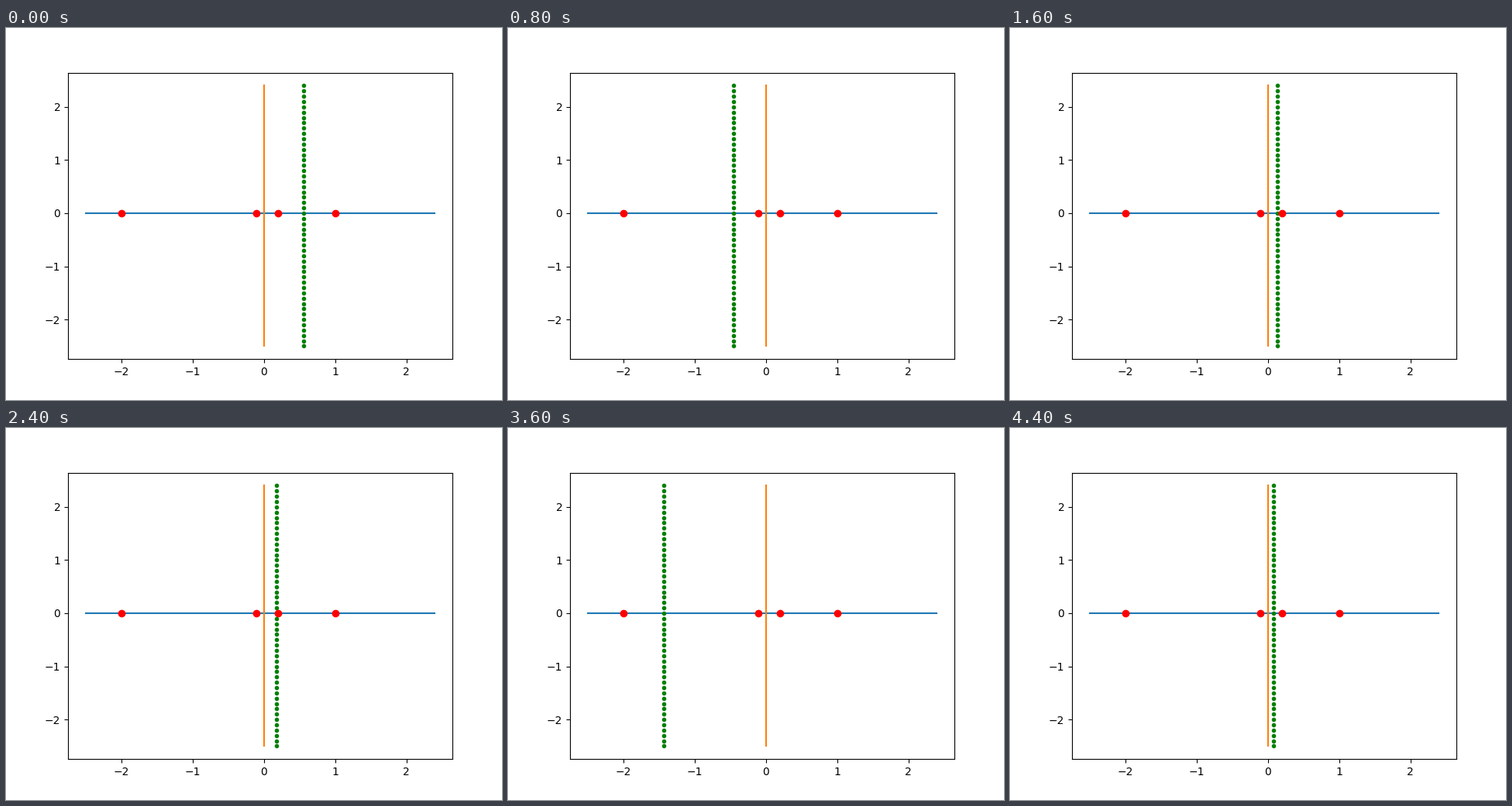
These frames come from a looping animation (640 px wide and 480 px high, 4.8 s). A matplotlib script:

```python
import numpy as np
import matplotlib.pyplot as plt
from matplotlib.animation import FuncAnimation

# Key points of the dotted line, one per step, with a hard jump between them
STOPS = (0.56, 0.35, -0.45, -1.43, 0.13, -0.9,
         0.18, -0.1, 0.07, -1.43, 0.6, 0.08)
LOOP_MS = 4800

fig, ax = plt.subplots(figsize=(6.4, 4.8), dpi=100)
span = np.arange(-25, 25) / 10
zeros = np.zeros_like(span)
points = np.array([-2, -0.1, 0.2, 1])

ax.plot(span, zeros)
ax.plot(zeros, span)
dots, = ax.plot(zeros, span, "g.")
ax.plot(points, np.zeros_like(points), "ro")


def update(step):
    dots.set_xdata(np.full_like(span, STOPS[step]))
    return dots,


anim = FuncAnimation(fig, update, frames=len(STOPS),
                     interval=LOOP_MS // len(STOPS),
                     repeat=True, repeat_delay=0)
plt.show()
```
